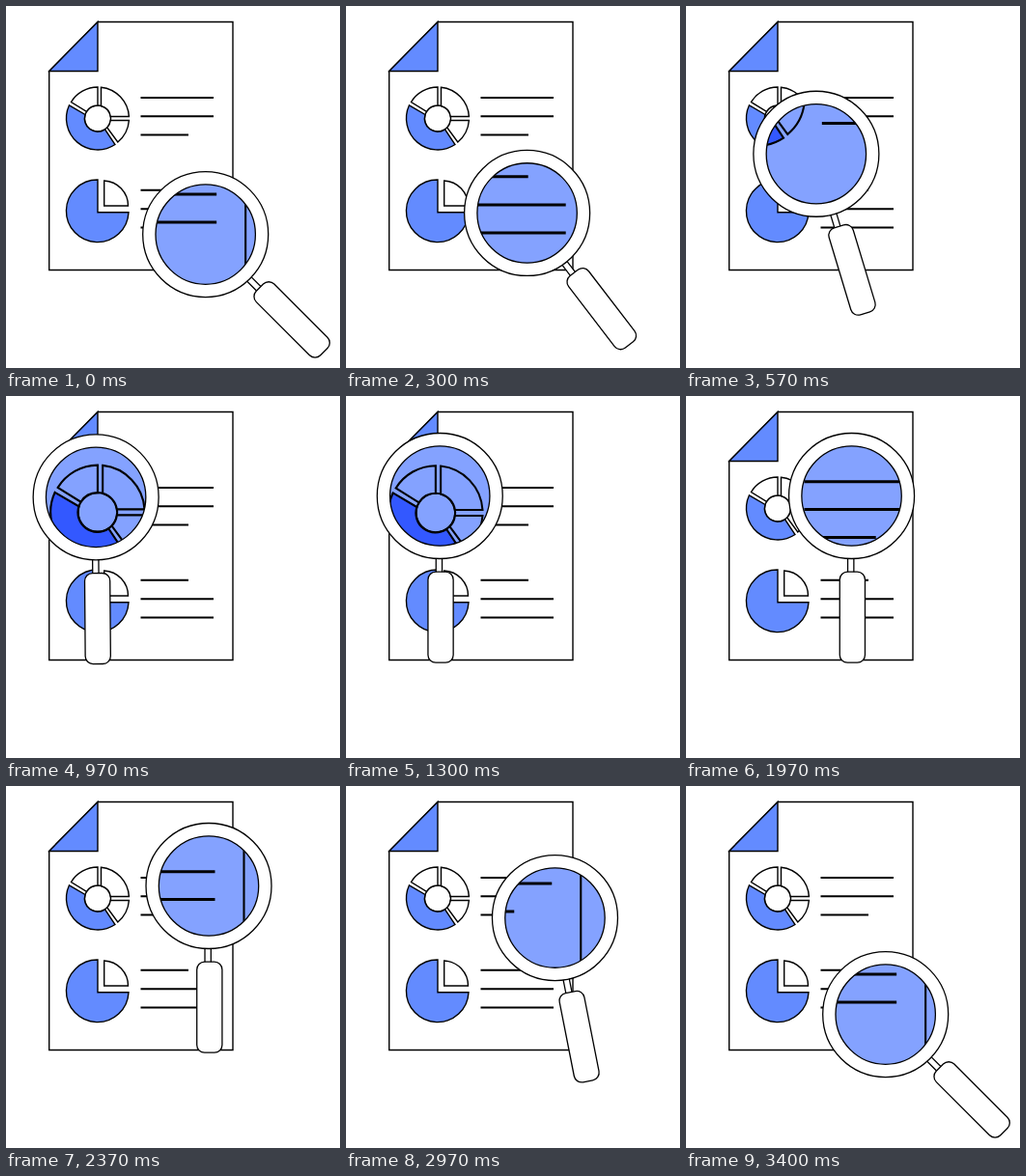
An HTML page without scripts for the animation above (3.66 s loop, 346x375 px).

```html
<!DOCTYPE html>
<html lang="en">
<head>
<meta charset="utf-8">
<title>Magnifier over report</title>
<style>
  @property --x { syntax: "<length>"; inherits: true; initial-value: 206.7px; }
  @property --y { syntax: "<length>"; inherits: true; initial-value: 236.6px; }
  @property --turn { syntax: "<angle>"; inherits: true; initial-value: -45deg; }

  html, body { margin: 0; width: 100%; height: 100%; overflow: hidden; background: #fff; }
  svg { display: block; width: 346px; height: 375px; }

  .page { --paper: #fff; --accent: #638bff; }
  .zoomed { --paper: #84a2ff; --accent: #3358ff; }
  .sheet { fill: var(--paper); stroke: #000; stroke-width: 1.4; }
  .accent { fill: var(--accent); }
  .text { stroke-width: 2; }

  .glass {
    fill: #fff; stroke: #000; stroke-width: 1.3;
    transform: translate(var(--x), var(--y));
    animation: scan 3660ms infinite;
  }
  .handle { transform: rotate(var(--turn)); }
  /* Enlarges the page 1.5 times around the lens centre */
  .zoomed { transform: translate(calc(var(--x) * -1.5 - 1px), calc(var(--y) * -1.5 - 2px)) scale(1.5); }

  @keyframes scan {
    0% { --x: 206.7px; --y: 236.6px; --turn: -45deg; animation-timing-function: cubic-bezier(.46, 0, .46, 1); }
    29.15% { --x: 92px; --y: 103.5px; --turn: 0deg; animation-timing-function: cubic-bezier(.42, 0, .51, 1); }
    74.68% { --x: 219.7px; --y: 103.5px; --turn: 0deg; animation-timing-function: cubic-bezier(.47, 0, .53, 1); }
    92.9%, 100% { --x: 206.7px; --y: 236.6px; --turn: -45deg; }
  }
</style>
</head>
<body>
<svg viewBox="0 0 346 375">
  <defs>
    <clipPath id="lens"><circle r="51.7"/></clipPath>
    <g id="sheet" class="sheet">
      <path d="M95 16.5H235V273.5H44.7V67.5Z"/>
      <path class="accent" d="M44.7 67.5H95V16.5Z"/>

      <!-- ring chart -->
      <circle cx="95" cy="116.5" r="13.5"/>
      <path d="M98.5 84.2A32.5 32.5 0 0 1 127.4 114.5H108.3A13.5 13.5 0 0 0 98.5 103.5Z"/>
      <path d="M95 84V103A13.5 13.5 0 0 0 83.4 109.4L67.5 99.5A32.5 32.5 0 0 1 95 84Z"/>
      <path class="accent" d="M65.5 102.8L82 112.5A13.5 13.5 0 0 0 102.5 127.8L113 143.5A32.5 32.5 0 0 1 65.5 102.8Z"/>
      <path d="M127.4 118.5H108.3A13.5 13.5 0 0 1 104.8 126L115.8 141A32.5 32.5 0 0 0 127.4 118.5Z"/>

      <!-- pie chart -->
      <path class="accent" d="M95 180V213.7H127A32.3 32.3 0 1 1 95 180Z"/>
      <path d="M101.7 181A26 26 0 0 1 126.5 207H101.7Z"/>

      <path class="text" d="M139.5 95H215M139.5 114.2H215M139.5 133.5H189M139.5 190.7H189M139.5 210.2H215M139.5 229.5H215"/>
    </g>
  </defs>

  <use class="page" href="#sheet"/>

  <g class="glass">
    <g class="handle">
      <rect x="-4" y="60" width="6.3" height="25"/>
      <rect x="-12.3" y="78.7" width="26.2" height="94" rx="8"/>
    </g>
    <circle r="65"/>
    <g clip-path="url(#lens)">
      <circle r="52" fill="#84a2ff" stroke="none"/>
      <use class="zoomed" href="#sheet"/>
    </g>
    <circle r="51.7" fill="none"/>
  </g>
</svg>
</body>
</html>
```
